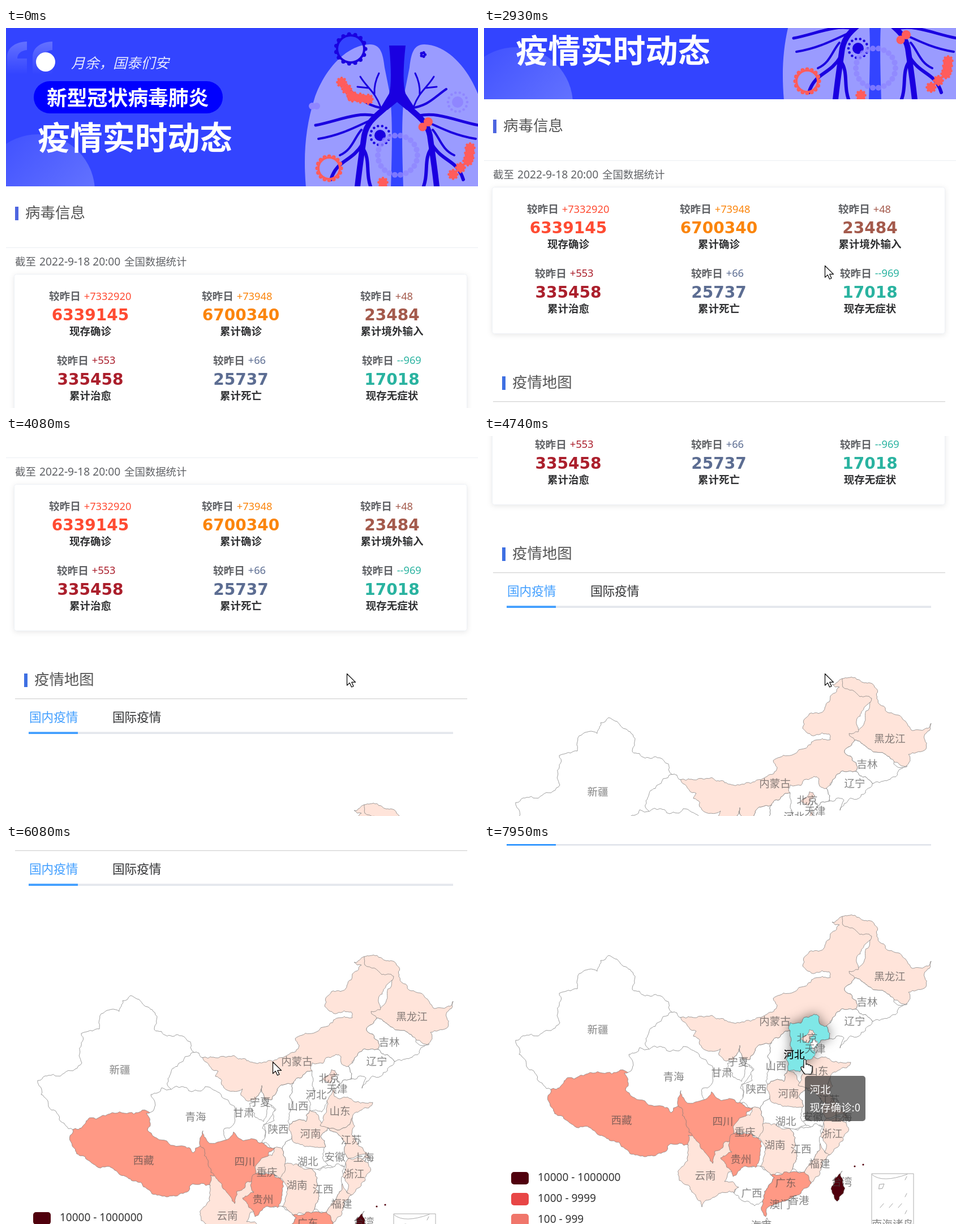
An HTML page that plays this animation: 834x672 px, repeating every 8 s.

```html
<!DOCTYPE html>
<html lang="zh-CN">
<head>
<meta charset="utf-8">
<title>疫情实时动态</title>
<style>
  html, body { margin: 0; width: 100%; height: 100%; overflow: hidden; background: #fff; }
  svg { display: block; width: 100%; height: 100%; }
  text { font-family: "Noto Sans CJK SC", "Noto Sans CJK", sans-serif; white-space: pre; }
  .latin { font-family: "Noto Sans", sans-serif; }
  .count { font-family: "DejaVu Sans", sans-serif; font-weight: 700; }
  .bold { font-weight: 700; }
  .thin { font-weight: 350; }
  .mid { text-anchor: middle; }
  .slogan { font-style: italic; font-weight: 300; }
  .land { stroke: #777; stroke-width: .7; stroke-linejoin: round; }
  .label { fill: #444; fill-opacity: .65; }
  #hover { fill: #7fe7e7; filter: drop-shadow(0 0 10px rgba(0, 0, 0, .5)); }
  #card { filter: drop-shadow(0 2px 5px rgba(0, 0, 0, .09)); }
</style>
</head>
<body>
<svg id="stage" viewBox="0 0 834 672"></svg>
<script>
const text = (x, y, size, fill, str, cls = '') =>
  `<text x="${x}" y="${y}" font-size="${size}" fill="${fill}" class="${cls}">${str}</text>`;
const rect = (x, y, w, h, fill, rx = 0) =>
  `<rect x="${x}" y="${y}" width="${w}" height="${h}" fill="${fill}" rx="${rx}"/>`;
const circle = (x, y, r, fill) => `<circle cx="${x}" cy="${y}" r="${r}" fill="${fill}"/>`;
const line = (d, color, width) =>
  `<path d="${d}" fill="none" stroke="${color}" stroke-width="${width}" stroke-linecap="round"/>`;
const repeat = (n, make) => Array.from({ length: n }, (_, i) => make(i)).join('');

// ---------- banner ----------
const NAVY = '#1a00e0', CORAL = '#ff5c5c', LILAC = '#8f86ff';

const beads = (cx, cy, radius, count, size, color) => repeat(count, i => {
  const a = i / count * 2 * Math.PI;
  return circle(cx + radius * Math.cos(a), cy + radius * Math.sin(a), size, color);
});
const ring = (x, y, r, n, color) =>
  `<circle cx="${x}" cy="${y}" r="${r}" fill="none" stroke="${color}" stroke-width="4"/>` + beads(x, y, r + 2, n, 3.6, color);
const sun = (x, y, color) => circle(x, y, 10, color) + beads(x, y, 17, 14, 2.3, color);
const blob = (x, y) => circle(x, y, 7.5, CORAL) + beads(x, y, 7.5, 8, 2.4, CORAL);
const chain = (x, y, dx, dy) => repeat(3, i => blob(x + dx * i, y + dy * i));

const quote = 'M2 82V52C2 36 14 25 37 24V39C26 40 20 46 20 54H37V82Z';
const backdrop = `
  <linearGradient id="fade" x2="0" y2="1"><stop stop-color="#fff" stop-opacity=".24"/><stop offset="1" stop-color="#fff" stop-opacity="0"/></linearGradient>
  <linearGradient id="glow" x2="1" y2="1"><stop stop-color="#3b4cff"/><stop offset="1" stop-color="#7180ff"/></linearGradient>`
  + rect(0, 0, 834, 280, '#3344ff')
  + `<path d="${quote}" fill="url(#fade)"/><path d="${quote}" fill="url(#fade)" transform="translate(45)"/>`
  + circle(56, 289, 101, 'url(#glow)');

const heading = circle(70, 60, 17, '#fff')
  + text(115, 71, 24.7, '#e6e9ff', '月余，国泰们安', 'slogan')
  + rect(49, 94, 334, 57, '#0000fe', 28.5)
  + text(72, 137, 35.8, '#fff', '新型冠状病毒肺炎', 'bold')
  + text(56, 215, 57.3, '#fff', '疫情实时动态', 'bold');

const lobe = '<path d="M530 282C525 225 529 175 545 125C562 75 600 30 643 29C662 29 666 45 669 70L677 110C684 150 682 220 680 282Z" fill="#9a9bff"/>';
const bronchi = line('M686 118C676 148 641 152 633 190C628 226 624 250 620 290', NAVY, 10)
  + line('M652 155C618 148 588 164 547 172', NAVY, 5)
  + line('M642 164C612 178 588 190 552 196M628 180C615 195 612 215 590 225', NAVY, 4)
  + line('M630 205C610 238 585 232 574 268M630 212C645 232 634 258 646 285', NAVY, 6)
  + line('M668 142C635 138 625 122 604 108', NAVY, 4)
  + line('M662 140C652 112 638 106 626 86M640 106L621 104M651 117Q650 98 659 80', NAVY, 3);
const lungs = `<g id="lung">${lobe}${bronchi}</g><use href="#lung" transform="translate(1382) scale(-1 1)"/>
  <path d="M677 31H706Q699 95 706 116L722 141L708 145L691 131L674 145L662 141L677 116Q683 95 677 31Z" fill="${NAVY}"/>`;

const viruses = ring(609, 37, 24, 15, NAVY) + ring(571, 248, 19, 16, CORAL)
  + sun(661, 190, NAVY) + sun(798, 131, LILAC)
  + beads(737, 47, 3.5, 5, 2.6, NAVY) + beads(545, 138, 4, 2, 6, LILAC)
  + `<g opacity=".8">${beads(692, 225, 35, 22, 5, LILAC)}</g>`
  + chain(593, 96, 9, 12) + chain(612, 122, 14, 2)
  + chain(820, 212, -1, 9) + chain(816, 235, -13, 12)
  + line('M746 166L736 174', CORAL, 4) + circle(746, 166, 8, CORAL) + circle(736, 175, 7.5, CORAL)
  + blob(666, 273);

const banner = `<clipPath id="bannerClip">${rect(0, 0, 834, 280, '#000')}</clipPath>
  <g clip-path="url(#bannerClip)">${backdrop}${heading}${lungs}${viruses}</g>`;

// ---------- statistics ----------
const stat = (center, x, y, delta, value, name, color) =>
  text(x, y, 18.6, '#606266', '较昨日', 'bold')
  + text(x + 61.7, y - .5, 18.3, color, delta, 'latin')
  + text(center, y + 36, 28, color, value, 'count mid')
  + text(center, y + 62, 18.5, '#303133', name, 'bold mid');

const summary = rect(0, 388, 834, 1, '#ebeef2')
  + rect(16, 316, 6, 24, '#4e66e0') + text(34, 336, 26.5, '#555', '病毒信息', 'thin')
  + text(16, 420, 18.5, '#606266', '截至', 'thin')
  + text(59, 420, 19.2, '#606266', '2022-9-18 20:00', 'latin')
  + text(209, 420, 18.4, '#606266', '全国数据统计', 'thin')
  + '<rect id="card" x="14.5" y="435.5" width="800" height="259" rx="4" fill="#fff" stroke="#edf0f5"/>';

const stats = stat(149, 76, 481, '+7332920', '6339145', '现存确诊', '#ff4b32')
  + stat(415, 346, 481, '+73948', '6700340', '累计确诊', '#fb850c')
  + stat(682, 626, 481, '+48', '23484', '累计境外输入', '#a45a4c')
  + stat(149, 90, 594.5, '+553', '335458', '累计治愈', '#ab1f2c')
  + stat(415, 366, 594.5, '+66', '25737', '累计死亡', '#5c6d92')
  + stat(682, 629, 594.5, '--969', '17018', '现存无症状', '#2ab3a0');

const tabs = rect(32, 770, 6, 24, '#3f70e2') + text(50, 790, 26.4, '#555', '疫情地图', 'thin')
  + rect(16, 814, 799, 1.3, '#d5d5d5')
  + text(41, 855, 21.6, '#409eff', '国内疫情', 'thin') + text(188, 855, 21.6, '#303133', '国际疫情', 'thin')
  + rect(40, 873.3, 750, 3.7, '#e4e7ed') + rect(40, 873.3, 87, 3.7, '#409eff');

// ---------- map ----------
const WHITE = '#fff', PINK = '#ffe4da', ORANGE = '#ff9985', DARK = '#50000d';

function noise(x, y) {
  const s = Math.sin(x * 12.9898 + y * 78.233) * 43758.5453;
  return s - Math.floor(s) - .5;
}
// Midpoint displacement; independent of direction, so neighbours share their borders.
function crinkle(a, b) {
  const dx = b[0] - a[0], dy = b[1] - a[1];
  if (Math.hypot(dx, dy) < 5) return [b];
  const mx = (a[0] + b[0]) / 2, my = (a[1] + b[1]) / 2;
  const k = noise(mx, my) * .4 * (dx > 0 || dx === 0 && dy > 0 ? 1 : -1);
  const mid = [mx - dy * k, my + dx * k];
  return [...crinkle(a, mid), ...crinkle(mid, b)];
}
function outline(points) {
  const p = points.split(' ').map(s => s.split(',').map(Number));
  const path = p.flatMap((a, i) => crinkle(a, p[(i + 1) % p.length]));
  return 'M' + path.map(q => q.map(v => v.toFixed(1)).join(' ')).join('L') + 'Z';
}

const northBorder = '56,347 75,338 134,316 133,264 165,256 172,228 200,225 206,206 220,197 263,227 262,257 310,268 331,297 402,303 440,316 500,301 518,285 511,273 560,253 593,236 612,236 610,226 563,216 575,190 600,185 628,143 615,138 633,128 655,126 690,143 694,163 740,200 755,219 790,207 778,255 750,262 747,284';
const eastCoast = '718,306 674,330 629,361 636,343 609,345 595,347 583,360 580,375 607,379 648,386 612,413 630,466 643,485 634,525 615,546 593,585 578,600 560,618 502,642 498,659 490,647';
const southBorder = '492,632 478,640 455,630 440,615 392,630 385,642 363,605 345,595 360,560 361,532 330,530 283,553 240,529 200,513 148,490 117,463 118,434 75,393 62,372';
const country = outline([northBorder, eastCoast, southBorder].join(' '));

const shapes = {};
let lands = '', cities = '', labels = '';
const land = (d, fill) => `<path class="land" d="${d}" fill="${fill}"/>`;
const label = (name, x, y) => labels += text(x, y + 7, 18.5, '', name, 'label thin mid');
// Each province covers the ones before it and is clipped by the country's outline.
function province(name, x, y, fill, points) {
  shapes[name] = outline(points);
  lands += land(shapes[name], fill);
  label(name, x, y);
}
function city(name, x, y, fill, points) {
  cities += land(outline(points), fill);
  label(name, x, y);
}

label('新疆', 201, 328);
province('甘肃', 420, 404, WHITE, '331,297 305,317 285,355 300,375 390,470 455,470 475,400 420,290');
province('西藏', 243, 488, ORANGE, '118,434 150,413 218,404 249,401 350,440 370,520 361,532 340,580 110,560 90,450');
province('青海', 335, 411, WHITE, '256,372 275,360 310,358 328,367 352,358 380,372 404,393 402,425 386,432 390,460 343,463 331,475 296,462 262,447 250,435 248,405 262,397 263,385');
province('宁夏', 449, 385, WHITE, '452,356 441,383 430,388 440,412 455,420 463,388 456,380');
province('陕西', 481, 433, WHITE, '456,380 470,381 477,370 508,352 503,400 505,450 488,468 452,458 455,425 474,418 477,398 463,388');
province('山西', 516, 392, WHITE, '541,330 508,352 503,400 501,425 530,420 537,400 548,350');
province('内蒙古', 514, 313, PINK, '340,298 352,314 375,331 370,340 385,360 418,362 415,373 428,384 441,383 452,356 456,380 470,381 477,370 508,352 541,330 600,330 616,307 657,292 648,265 637,258 655,237 720,100 500,160 400,280');
province('黑龙江', 717, 234, PINK, '633,128 634,143 664,160 685,163 681,180 645,225 655,237 690,258 716,266 747,284 810,270 800,180 640,110');
province('吉林', 677, 279, WHITE, '655,237 690,258 716,266 724,279 760,284 740,330 690,320 675,302 657,292 648,265 637,258');
province('辽宁', 655, 313, WHITE, '657,292 616,307 605,322 611,335 600,370 640,380 690,320 675,302');
province('湖北', 533, 490, WHITE, '505,450 565,464 572,497 540,503 487,498 494,488 488,468');
province('河南', 538, 441, PINK, '537,400 553,413 569,431 556,446 565,464 545,465 505,450 501,425 530,420');
province('河北', 548, 372, WHITE, '541,316 560,317 583,301 592,305 593,318 605,322 611,335 609,345 595,347 583,360 585,372 567,383 558,403 537,400 545,365 541,330');
province('山东', 590, 401, PINK, '555,427 567,383 580,360 660,370 660,400 612,413 596,431 569,431');
province('江苏', 610, 452, PINK, '569,431 596,431 612,413 670,470 636,478 605,485 600,462');
province('安徽', 581, 482, WHITE, '569,431 600,462 605,485 598,500 562,490 565,464 556,446');
province('浙江', 615, 512, PINK, '605,485 625,484 670,490 640,560 602,545 592,515');
province('江西', 560, 539, WHITE, '540,503 598,500 594,530 575,565 566,580 545,575');
province('湖南', 514, 532, PINK, '487,498 515,495 540,503 545,575 508,585 488,570 484,520');
province('福建', 593, 565, PINK, '594,530 602,545 640,555 590,610 570,590 566,580 575,565');
province('云南', 391, 586, PINK, '361,515 430,520 450,607 430,660 330,650 330,590 355,537');
province('广西', 473, 617, WHITE, '425,597 432,580 488,570 513,590 492,632 490,670 440,640 450,607');
province('四川', 422, 490, ORANGE, '348,436 356,455 390,452 402,438 427,452 475,466 440,500 450,519 424,528 404,565 390,545 362,510 343,463');
province('重庆', 461, 509, PINK, '475,466 488,468 494,488 484,520 441,512 440,500 470,480');
province('贵州', 454, 557, ORANGE, '441,512 470,512 484,520 488,550 480,572 440,588 418,555 438,545');
province('广东', 533, 599, ORANGE, '508,585 530,580 566,580 578,600 600,630 500,680 480,650 492,632 513,590');
city('北京', 571, 343, '#f9dcd3', '560,345 575,328 585,335 574,352');
city('天津', 585, 362, WHITE, '584,345 590,350 583,367 577,352');
city('上海', 632, 483, PINK, '636,478 643,485 626,490');
city('海南', 490, 674, WHITE, '478,672 500,661 506,690');
city('台湾', 632, 597, DARK, '633,578 634,600 624,632 613,610 619,593');
label('香港', 556, 630);
label('澳门', 523, 637);
label('南海诸岛', 722, 672);

const islands = circle(655, 570, 1.6, DARK) + circle(670, 567, 1.6, DARK)
  + line('M685 680V583H759V680M686 585Q704 600 748 584', '#999', .8)
  + line('M699 602l8 -1l-3 8l-6 1z', '#999', .9)
  + repeat(3, i => line(`M744 ${594 + i * 30}l3 -6M${700 + i * 16} 643l6 -7`, '#999', .9));

const legend = ['10000 - 1000000', '1000 - 9999', '100 - 999'].map((range, i) =>
  rect(48, 580 + i * 37, 31, 22, [DARK, '#e84646', '#f0766b'][i], 5)
  + text(95, 595.5 + i * 37, 19, '#333', range, 'latin')).join('');

const map = `<g transform="translate(0 874)">
  <clipPath id="countryClip"><path d="${country}"/></clipPath>
  <g clip-path="url(#countryClip)">${lands}</g>${land(country, 'none')}
  <path id="hover" class="land"/>${cities}${islands}${labels}
  <text id="hoverLabel" class="mid thin" font-size="18.5"></text>${legend}</g>`;

// ---------- overlay ----------
const tooltip = `<g id="tooltip">${rect(0, 0, 107, 80, 'rgba(50,50,50,.7)', 5)}
  <text id="tipName" x="8.5" y="31" font-size="18.5" fill="#fff"></text>${text(8.5, 63, 18.5, '#fff', '现存确诊:0')}</g>`;
const cursor = `<g id="cursor" fill="#fff" stroke="#000" stroke-linejoin="round" stroke-width="1.2">
  <path id="arrow" d="M.5 .5V21L5.2 16.6L8.6 24L12 22.5L8.8 15.4H15.5Z"/>
  <path id="hand" d="M-2 3C-2 0 2 0 2 3V10Q6 8 6 11Q9 9 9.500 12.500Q13 11 13 15V19Q13 22 11 27H0Q-6 20 -7 16C-7 13 -4 13 -2 16Z"/></g>`;

const $ = id => document.getElementById(id);
$('stage').innerHTML = `<g id="page">${banner}${summary}${stats}${tabs}${map}</g>${tooltip}${cursor}`;

// ---------- motion ----------
const SCROLL3 = [.273, .721, 1], SCROLL4 = [.06, .317, .75, 1], GLIDE4 = [.15, .5, .85, 1];
const ENTER = Array.from({ length: 12 }, (_, i) => i / 11);
const scrolls = [[2720, 2930, SCROLL4, 154], [3320, 3550, SCROLL4, 154], [4080, 4210, SCROLL3, 154],
  [4670, 4810, SCROLL3, 154], [5270, 5410, SCROLL3, 154], [6010, 6220, SCROLL4, 104]];
const glides = [[880, 1650, ENTER, -106, -179], [1720, 1930, GLIDE4, -48, -61],
  [5740, 5946, GLIDE4, -131, -35], [7740, 7950, GLIDE4, 96, -5]];

function stepped(t, [start, end, curve]) {
  if (t < start) return 0;
  const last = curve.length - 1;
  return curve[Math.min(last, Math.floor((t - start) / (end - start) * last + 1e-6))];
}
const total = (t, moves, i) => moves.reduce((sum, m) => sum + m[i] * stepped(t, m), 0);
const show = (id, on) => $(id).setAttribute('display', on ? 'inline' : 'none');
const place = (id, x, y) => $(id).setAttribute('transform', `translate(${x} ${y})`);
const labelSpots = { 陕西: [481, 440], 山西: [516, 399], 河北: [548, 379] };

function draw(t) {
  const x = 756 + total(t, glides, 3), y = 660 + total(t, glides, 4);
  place('page', 0, -Math.round(total(t, scrolls, 3)));
  place('cursor', x, y);
  show('cursor', t >= 880);

  const hovered = t < 7740 ? '' : x < 505 ? '陕西' : x < 543 ? '山西' : '河北';
  show('arrow', !hovered);
  show('hand', hovered);
  show('tooltip', hovered);
  place('tooltip', x, y + 30);
  $('hover').setAttribute('d', shapes[hovered] || '');
  $('tipName').textContent = $('hoverLabel').textContent = hovered;
  place('hoverLabel', ...(labelSpots[hovered] || [0, 0]));
}

const began = performance.now();
(function frame() {
  draw((performance.now() - began) % 8000);
  requestAnimationFrame(frame);
})();
</script>
</body>
</html>
```
